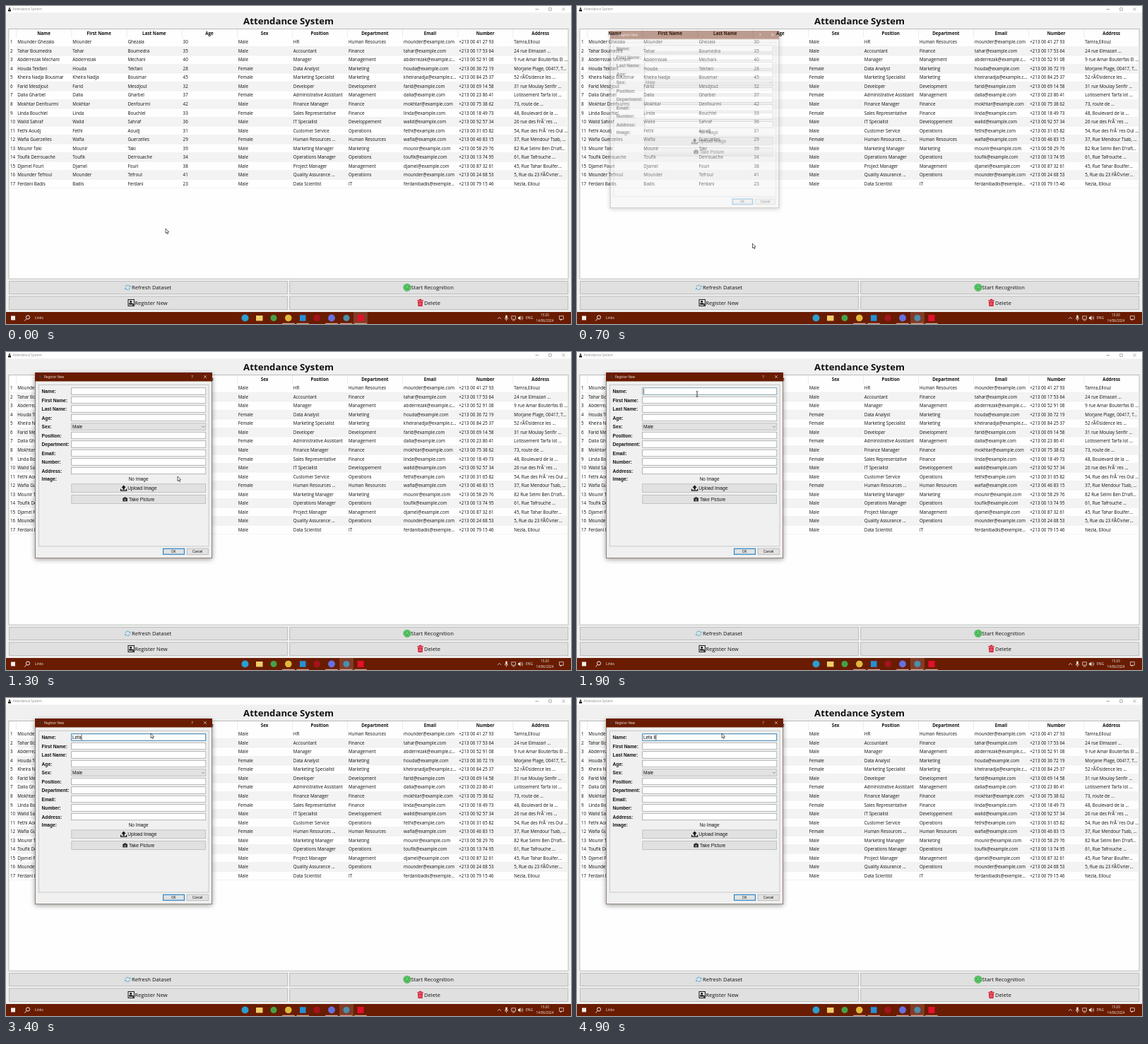
Write an HTML page with a canvas that moves like this. It is 800 by 450 pixels and loops after 5 s.

```html
<!DOCTYPE html>
<html lang="en">
<head>
<meta charset="utf-8">
<title>Attendance System</title>
<style>
html, body { margin: 0; width: 100%; height: 100%; overflow: hidden; background: #eff0ef; }
canvas { display: block; width: 800px; height: 450px; }
</style>
</head>
<body>
<canvas id="stage"></canvas>
<script>
const dpr = window.devicePixelRatio || 1;

function setup(canvas) {
  canvas.width = 800 * dpr;
  canvas.height = 450 * dpr;
  const c = canvas.getContext('2d');
  c.scale(dpr, dpr);
  return c;
}

const stage = setup(document.getElementById('stage'));
const layer = setup(document.createElement('canvas'));
let ctx = stage;

const LOOP = 5000, STEP = 100;
const UI = '"Open Sans", "Noto Sans", sans-serif';
const FORM = '"Liberation Sans", Arial, sans-serif';
const BAR = '#691c02';

const HEADERS = ['Name', 'First Name', 'Last Name', 'Age', 'Sex', 'Position',
  'Department', 'Email', 'Number', 'Address'];

// first | last | age | sex | position | department | number | address
const ROWS = `Mounder|Ghezala|30|M|HR|Human Resources|00 41 27 93|Tamra,Ellouz
Tahar|Boumedra|35|M|Accountant|Finance|00 17 53 64|24 rue Elmazari ...
Abderrezak|Mechani|40|M|Manager|Management|00 52 91 08|9 rue Amar Bouterfas El ...
Houda|Tekfani|28|F|Data Analyst|Marketing|00 36 72 19|Morjane Plage, 00417, T...
Kheira Nadja|Bousmar|45|F|Marketing Specialist|Marketing|00 84 25 37|52 rÃ©sidence les ...
Farid|Mesdjout|32|M|Developer|Development|00 69 14 58|31 rue Moulay Senfir ...
Dalia|Gharbel|37|F|Administrative Assistant|Management|00 23 86 41|Lotissement Tarfa lot ...
Mokhtar|Denfourmi|42|M|Finance Manager|Finance|00 75 38 62|73, route de ...
Linda|Bouchlel|33|F|Sales Representative|Finance|00 18 49 73|48, Boulevard de la ...
Walid|Sahraf|36|M|IT Specialist|Developpement|00 92 57 34|26 rue des FrÃ¨res ...
Fethi|Aoudj|31|M|Customer Service|Operations|00 31 65 82|54, Rue des FrÃ¨res Oul ...
Wafia|Guerzelles|29|F|Human Resources ...|Human Resources|00 46 83 15|37, Rue Mendour Tsab, ...
Mounir|Taki|39|M|Marketing Manager|Marketing|00 58 29 76|82 Rue Selmi Ben D'rafi...
Toufik|Derrouache|34|M|Operations Manager|Operations|00 13 74 95|61, Rue Tafrouche ...
Djamel|Fouri|38|M|Project Manager|Management|00 87 32 61|45, Rue Tahar Boulfer...
Mounder|Tefroul|41|M|Quality Assurance ...|Operations|00 24 68 53|5, Rue du 23 FÃ©vrier...
Badis|Ferdani|23|M|Data Scientist|IT|00 79 15 46|Nezla, Ellouz`.split('\n').map((line, i, all) => {
  const [first, last, age, sex, job, dept, num, addr] = line.split('|');
  const isLast = i === all.length - 1;
  const name = isLast ? `${last} ${first}` : `${first} ${last}`;
  let mail = first.toLowerCase().replace(' ', '') + '@example.com';
  if (mail.length > 20) mail = mail.slice(0, -2) + '...';
  if (isLast) mail = 'ferdanibadis@exemple...';
  return [name, first, last, age, sex === 'M' ? 'Male' : 'Female', job, dept, mail, '+213 ' + num, addr];
});

const LABELS = ['Name', 'First Name', 'Last Name', 'Age', 'Sex', 'Position',
  'Department', 'Email', 'Number', 'Address', 'Image'];
const fieldY = i => 55.5 + 12.5 * i;

// time, x, y of the pointer
const PATH = [[0, 226, 315], [350, 221, 420], [600, 221, 420], [800, 276, 252],
  [1300, 243, 176], [1750, 170, 59.5], [2000, 170, 59.5], [2400, 205, 50], [5000, 205, 50]];

const TYPED = 'Lefa Il';
const KEY_TIMES = [2300, 2600, 2900, 3200, 3900, 4300, 4700];

const clamp = v => Math.max(0, Math.min(1, v));

function rect(x, y, w, h, fill) {
  ctx.fillStyle = fill;
  ctx.fillRect(x, y, w, h);
}

function outline(x, y, w, h, color, line = 0.8) {
  ctx.strokeStyle = color;
  ctx.lineWidth = line;
  ctx.strokeRect(x + line / 2, y + line / 2, w - line, h - line);
}

function box(x, y, w, h, fill, border, line) {
  rect(x, y, w, h, fill);
  outline(x, y, w, h, border, line);
}

function text(s, x, y, size, { color = '#111', weight = 400, font = UI, align = 'left' } = {}) {
  ctx.font = `${weight} ${size}px ${font}`;
  ctx.textAlign = align;
  ctx.fillStyle = color;
  ctx.fillText(s, x, y + size * 0.36);
}

function dot(x, y, r, fill) {
  ctx.beginPath();
  ctx.arc(x, y, r, 0, 2 * Math.PI);
  ctx.fillStyle = fill;
  ctx.fill();
}

function stroke(points, color, width = 0.8) {
  ctx.beginPath();
  points.forEach(([x, y]) => ctx.lineTo(x, y));
  ctx.strokeStyle = color;
  ctx.lineWidth = width;
  ctx.stroke();
}

function arc(x, y, r, from, to, color, width) {
  ctx.beginPath();
  ctx.arc(x, y, r, from, to);
  ctx.strokeStyle = color;
  ctx.lineWidth = width;
  ctx.stroke();
}

function poly(points, fill) {
  ctx.beginPath();
  points.forEach(([x, y]) => ctx.lineTo(x, y));
  ctx.closePath();
  ctx.fillStyle = fill;
  ctx.fill();
}

function cross(x, y, r, color) {
  stroke([[x - r, y - r], [x + r, y + r]], color, 0.6);
  stroke([[x - r, y + r], [x + r, y - r]], color, 0.6);
}

function pointerAt(t) {
  const i = PATH.findIndex((p, k) => k && t <= p[0]);
  const [t0, x0, y0] = PATH[i - 1], [t1, x1, y1] = PATH[i];
  const u = (t - t0) / (t1 - t0), e = u * u * (3 - 2 * u);
  return [x0 + (x1 - x0) * e, y0 + (y1 - y0) * e];
}

function drawTitleBar() {
  rect(0, 0, 800, 9.5, '#fdfefd');
  dot(5, 3.4, 1.2, '#222');
  rect(3, 5, 4, 2.6, '#222');
  text('Attendance System', 9.5, 4.8, 4.6, { color: '#8c8c8c' });
  rect(749.5, 4.4, 4.5, 0.7, '#777');
  box(768.5, 2.5, 4, 4, '#fdfefd', '#777', 0.6);
  cross(789.5, 4.5, 2, '#777');
}

function drawTable() {
  const colX = i => 14.5 + 78.13 * i;
  box(3.5, 32, 793, 354.5, '#fdfefd', '#a9aaa9');
  HEADERS.forEach((h, i) => {
    rect(colX(i), 33, 0.6, 12, '#dfe0df');
    text(h, colX(i + 0.5), 39.2, 6.25, { weight: 700, align: 'center' });
  });
  ROWS.forEach((row, r) => {
    const y = 51.1 + 12.52 * r;
    if (r % 2) rect(14.5, y - 6.2, 781, 12.5, '#f2f3f2');
    rect(4.5, y + 6, 791, 0.5, '#e6e7e6');
    text(r + 1, 6, y, 6.25);
    row.forEach((cell, i) => text(cell, colX(i) + 1.7, y, 6.25));
  });
}

function refreshIcon(x, y) {
  const blue = '#5fb0da';
  arc(x, y, 3.2, Math.PI * 1.05, Math.PI * 1.85, blue, 1);
  arc(x, y, 3.2, Math.PI * 0.05, Math.PI * 0.85, blue, 1);
  poly([[x + 1.8, y - 0.8], [x + 4.4, y - 0.8], [x + 3.9, y - 3.4]], blue);
  poly([[x - 1.8, y + 0.8], [x - 4.4, y + 0.8], [x - 3.9, y + 3.4]], blue);
}

function faceIcon(x, y) {
  dot(x, y, 5.4, '#1f9a35');
  dot(x, y, 4.6, '#6fdc78');
  arc(x, y, 3.1, 0, 2 * Math.PI, '#1f8a32', 0.7);
  dot(x - 1.2, y - 0.8, 0.5, '#145c22');
  dot(x + 1.2, y - 0.8, 0.5, '#145c22');
  arc(x, y + 0.2, 1.5, 0.3, Math.PI - 0.3, '#145c22', 0.6);
}

function badgeIcon(x, y) {
  box(x - 4.7, y - 5, 9.4, 10, '#eee', '#111', 1);
  dot(x - 0.5, y - 1.7, 1.5, '#111');
  rect(x - 3, y + 0.4, 5, 2.3, '#111');
  rect(x + 2, y + 1.3, 1.6, 2.4, '#111');
}

function trashIcon(x, y) {
  const red = '#d5192d';
  rect(x - 4.2, y - 4, 8.4, 1.4, red);
  rect(x - 1.5, y - 5.2, 3, 1.3, red);
  poly([[x - 3.6, y - 2], [x + 3.6, y - 2], [x + 3, y + 5], [x - 3, y + 5]], red);
  for (const d of [-1.5, 0, 1.5]) rect(x + d - 0.25, y - 0.8, 0.5, 4.6, '#f3c4c8');
}

function drawButtons(hover) {
  const button = (x, y, h, label, textX, icon, iconX, hot) => {
    box(x, y, 394.8, h, hot ? '#e6f0ef' : '#dfe0df', hot ? '#6fb2cb' : '#b4b5b4');
    icon(iconX, y + h / 2 - 0.2);
    text(label, textX, y + h / 2 + 0.2, 7.6);
  };
  button(4, 389, 19, 'Refresh Dataset', 178, refreshIcon, 172.3);
  button(401.4, 389, 19, 'Start Recognition', 573.3, faceIcon, 568);
  button(4, 410.5, 19.3, 'Register New', 182.3, badgeIcon, 177.2, hover);
  button(401.4, 410.5, 19.3, 'Delete', 592, trashIcon, 586.6);
}

function drawTaskbar(active) {
  const white = '#f4ece8', y = 441.5;
  rect(0, 433, 800, 17, BAR);
  rect(active - 10, 433, 20, 17, '#823c27');
  rect(7, 438.5, 6, 6, white);
  arc(31, 440.5, 2.6, 0, 2 * Math.PI, white, 1);
  stroke([[29.2, 442.5], [26.3, 445.5]], white, 1);
  text('Links', 41, y, 5, { color: white });

  dot(338.5, y, 5, '#2b9fd0');
  rect(354, 438, 9.5, 7.5, '#f0cd68');
  dot(379, y, 4.5, '#45a148');
  dot(399.8, y, 4.8, '#e0b83c');
  rect(416, 437.3, 8.5, 8.5, '#2490d8');
  dot(440.2, y, 4.8, '#a3141c');
  dot(461, y, 4.9, '#6670e0');
  dot(482, y, 4.5, '#4a8fae');
  rect(497.5, 437, 9, 9, '#e3102c');
  for (const x of [400, 420.3, 461, 481.7, 502]) rect(x - 8.8, 448.8, 17.5, 1.2, '#d8a592');

  stroke([[696.2, 442.8], [698.6, 440.4], [701, 442.8]], white);
  rect(707.3, 437.7, 2.4, 4.6, white);
  arc(708.5, 441.4, 2.3, 0, Math.PI, white, 0.6);
  rect(708.2, 443.5, 0.7, 2, white);
  box(715.5, 438.5, 6.5, 5, BAR, white, 0.7);
  rect(717, 444.6, 3.5, 0.7, white);
  poly([[725, 440.3], [726.4, 440.3], [728.4, 438.3], [728.4, 444.7], [726.4, 442.7], [725, 442.7]], white);
  arc(728, y, 2.2, -0.9, 0.9, white, 0.6);
  arc(728, y, 3.8, -0.9, 0.9, white, 0.6);
  text('ENG', 736, y, 5, { color: white });
  text('15:20', 763, 437.5, 4.7, { color: white, align: 'center' });
  text('14/06/2024', 763, 445.3, 4.7, { color: white, align: 'center' });
  box(783, 438.4, 6.6, 5.2, BAR, white, 0.7);
  poly([[785, 443.2], [787.4, 443.2], [785, 445.4]], white);
}

function uploadIcon(x, y) {
  poly([[x, y - 4.3], [x + 3.2, y - 0.8], [x + 1.2, y - 0.8], [x + 1.2, y + 2],
    [x - 1.2, y + 2], [x - 1.2, y - 0.8], [x - 3.2, y - 0.8]], '#111');
  stroke([[x - 4, y + 1], [x - 4, y + 3.4], [x + 4, y + 3.4], [x + 4, y + 1]], '#111', 1.3);
}

function cameraIcon(x, y) {
  rect(x - 3.2, y - 2, 6.4, 4.8, '#111');
  rect(x - 1.5, y - 3, 3, 1.2, '#111');
  dot(x, y + 0.4, 1.5, '#ddd');
  dot(x, y + 0.4, 0.8, '#111');
}

function drawForm(t) {
  const form = { font: FORM };
  ctx.save();
  ctx.shadowColor = 'rgba(0,0,0,0.4)';
  ctx.shadowBlur = 7 * dpr;
  ctx.shadowOffsetY = 1.5 * dpr;
  rect(41, 29, 251, 263, '#5c3a30');
  ctx.restore();
  rect(41.6, 29, 249.8, 262.4, '#eff0ef');
  rect(41, 29, 251, 12.5, BAR);
  dot(48.8, 35.3, 1.8, '#3f3440');
  text('Register New', 54, 35.4, 4.6, { color: '#f4ece8' });
  text('?', 263.5, 35.2, 6, { color: '#f4ece8', align: 'center' });
  cross(282, 35, 2, '#f4ece8');
  box(46, 46, 241.3, 229.3, '#eff0ef', '#b9bab9', 0.7);

  LABELS.forEach((label, i) => {
    const y = fieldY(i) - (i === 10 ? 1 : 0);
    text(label + ':', 50.6, y + 0.2, 6.6, { ...form, weight: 700 });
    if (i === 10) return;
    const combo = i === 4;
    box(92.3, y - 5.1, 190.9, 10.2, combo ? '#e1e2e1' : '#fdfefd', combo ? '#b0b1b0' : '#949594', 0.7);
  });
  ctx.globalAlpha = clamp((t - 1800) / 300);
  outline(92.3, fieldY(0) - 5.1, 190.9, 10.2, '#2a86c8');
  ctx.globalAlpha = 1;

  text('Male', 94, fieldY(4) + 0.2, 6.6, form);
  stroke([[277.3, 104.9], [279.2, 106.8], [281.1, 104.9]], '#555', 0.6);
  text('No Image', 187.6, 179.8, 6.4, { ...form, align: 'center' });

  box(92.5, 186.5, 190.5, 12.5, '#e0e1e0', '#b4b5b4', 0.7);
  uploadIcon(166.6, 192.7);
  text('Upload Image', 172.3, 192.8, 6.6, form);
  box(92.5, 202.3, 190.5, 12.5, '#e0e1e0', '#b4b5b4', 0.7);
  cameraIcon(168.6, 208.5);
  text('Take Picture', 174, 208.7, 6.6, form);

  box(222, 277.8, 31, 9, '#e1e2e1', '#1f7fc9', 1.1);
  text('OK', 237.3, 282.4, 4.6, { ...form, align: 'center' });
  box(255.8, 277.8, 31, 9, '#e1e2e1', '#b0b1b0', 0.7);
  text('Cancel', 271.2, 282.4, 4.6, { ...form, align: 'center' });

  if (t >= 1800) {
    const typed = TYPED.slice(0, KEY_TIMES.filter(k => k <= t).length);
    text(typed, 94, 55.8, 6.4, form);
    rect(94.2 + ctx.measureText(typed).width, 51.7, 0.7, 7.8, '#111');
  }
}

// Drawn on its own layer so the whole window fades as one.
function drawDialog(t) {
  const p = clamp((t - 600) / 230);
  if (!p) return;
  ctx = layer;
  ctx.clearRect(0, 0, 800, 450);
  drawForm(t);
  ctx = stage;

  const s = 0.92 + 0.08 * p;
  ctx.save();
  ctx.globalAlpha = p;
  ctx.translate(166.5, 160.5);
  ctx.scale(s, s);
  ctx.drawImage(layer.canvas, -166.5, -160.5, 800, 450);
  ctx.restore();
}

function drawPointer(x, y, beam) {
  if (beam) {
    stroke([[x, y - 3.6], [x, y + 3.6]], '#222', 0.8);
    for (const d of [-3.6, 3.6]) stroke([[x - 1.6, y + d], [x + 1.6, y + d]], '#222', 0.7);
    return;
  }
  const shape = [[0, 0], [0, 6.6], [1.5, 5.3], [2.5, 7.6], [3.6, 7.1], [2.6, 4.9], [4.6, 4.8]]
    .map(([dx, dy]) => [x + dx, y + dy]);
  poly(shape, '#fff');
  stroke([...shape, shape[0]], '#222', 0.7);
}

function render(t) {
  const [x, y] = pointerAt(t);
  const open = t >= 700;
  const inField = x > 93 && x < 283 && LABELS.some((_, i) => i < 10 && i !== 4 && Math.abs(y - fieldY(i)) < 5);
  rect(0, 0, 800, 450, '#eff0ef');
  drawTitleBar();
  text('Attendance System', 400, 21.4, 13.2, { weight: 700, align: 'center' });
  drawTable();
  drawButtons(!open && y > 411 && y < 430);
  drawTaskbar(t < 500 ? 502 : 482);
  drawDialog(t);
  drawPointer(x, y, open && inField);
}

const start = performance.now();
function tick() {
  const t = (performance.now() - start) % LOOP;
  render(Math.floor(t / STEP) * STEP);
  requestAnimationFrame(tick);
}
tick();
</script>
</body>
</html>
```
